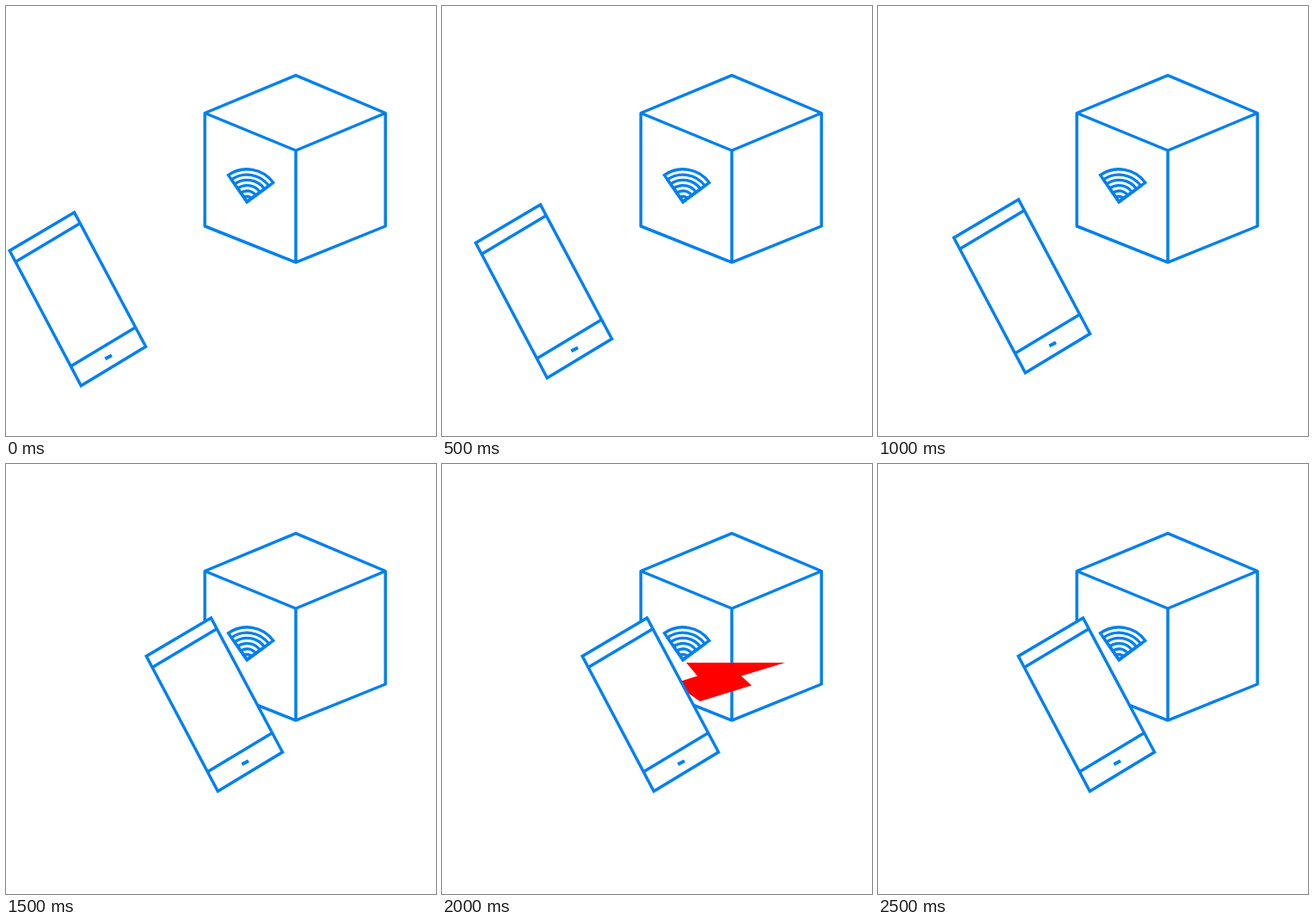
Animation, 500 px wide and 500 px high, one loop 3 s. Source, as an HTML page:

```html
<!DOCTYPE html>
<html lang="en">
<head>
<meta charset="utf-8">
<title>Phone tap</title>
<style>
  html, body { margin: 0; width: 100%; height: 100%; overflow: hidden; background: #fff; }
  svg { display: block; width: 100vw; height: 100vh; }
  .line { fill: none; stroke: #0080f0; stroke-width: 3.5; }
  #waves .line { stroke-width: 3.3; }
  #phone .body { fill: #fff; }
  #phone .key { stroke-width: 4; }
  #bolt { fill: #f00; }
</style>
</head>
<body>
<svg viewBox="0 0 500 500">
  <path class="line" stroke-linejoin="round" d="M337 80.7 441.2 124.5V256L337 298.1 231.2 256V124.5ZM231.2 124.5 337 168 441.2 124.5M337 168V298"/>
  <g id="waves"></g>
  <path id="bolt" d="M284 231H399L348 246.5 360 257.5 300 276 270 255 297 246.5Z"/>
  <g id="phone">
    <path class="line body" d="M238.4 179 163.2 223.5 246.3 380.5 321.5 335Z"/>
    <path class="line" d="M170.5 236.2 245 191.7M235 357.6 309.5 312.8"/>
    <path class="line key" d="M274.3 349.2 282 345.2"/>
  </g>
</svg>
<script>
  const LOOP = 3000, STEP = 500;
  const get = id => document.getElementById(id);

  // Nested fan-shaped sectors sharing one apex
  const point = (r, deg) => {
    const a = deg * Math.PI / 180;
    return `${280.2 + r * Math.cos(a)} ${227.6 + r * Math.sin(a)}`;
  };
  for (let r = 37.8; r > 4; r -= 6.3) {
    const arc = document.createElementNS(get('waves').namespaceURI, 'path');
    arc.setAttribute('class', 'line');
    arc.setAttribute('d', `M${point(0, 0)}L${point(r, -125)}A${r} ${r} 0 0 1 ${point(r, -36)}Z`);
    get('waves').append(arc);
  }

  // Phone offsets from its resting place at the box, one per step
  const stops = [[-159, 61], [-124, 52], [-75, 46], [0, 0]];
  const boltStep = 4;

  function draw(now) {
    const step = Math.floor(now % LOOP / STEP);
    const [x, y] = stops[Math.min(step, stops.length - 1)];
    get('phone').setAttribute('transform', `translate(${x} ${y})`);
    get('bolt').style.display = step === boltStep ? '' : 'none';
  }

  const start = performance.now();
  (function tick() {
    draw(performance.now() - start);
    requestAnimationFrame(tick);
  })();
</script>
</body>
</html>
```
